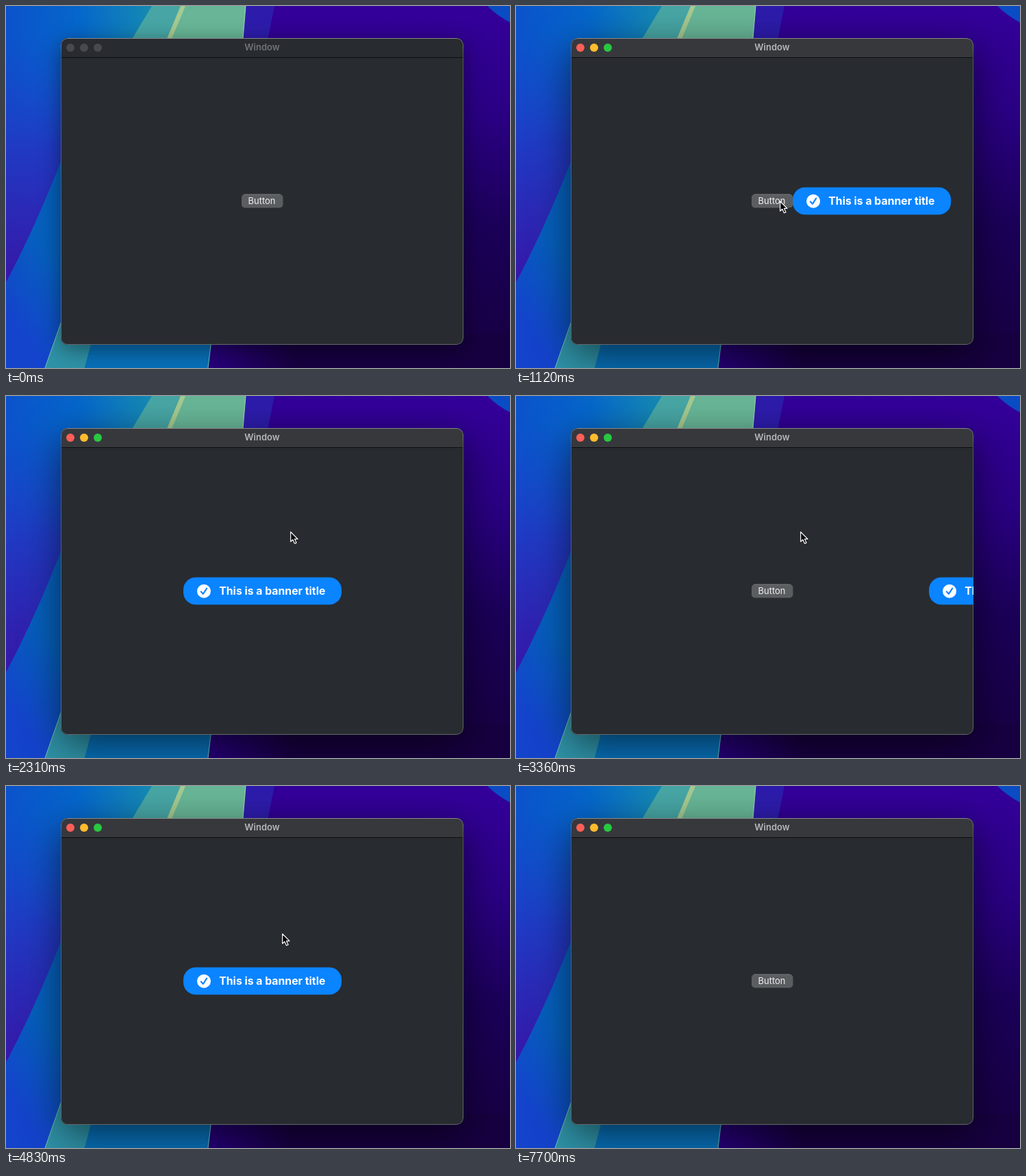
An HTML page that plays this animation: 736x530 px, repeating every 7.91 s.

```html
<!DOCTYPE html>
<html lang="en">
<head>
<meta charset="utf-8">
<title>Banner</title>
<style>
  html, body { margin: 0; width: 100%; height: 100%; overflow: hidden; background: #180040; }
  svg { display: block; width: 736px; height: 530px; }
  text { font-family: Inter, sans-serif; text-anchor: middle; }
  #shadow { fill: #282b2f; filter: drop-shadow(0 7px 16px rgba(0, 0, 0, .45)); }
  #bar { fill: #282b2f; }
  #title { font-size: 13px; font-weight: 600; fill: #717376; }
  #lights circle { fill: #48494d; }
  .active #shadow { filter: drop-shadow(0 15px 28px rgba(0, 0, 0, .55)); }
  .active #bar { fill: #37383c; }
  .active #title { fill: #b6b7b9; }
  .active #lights :nth-child(1) { fill: #ff5f57; }
  .active #lights :nth-child(2) { fill: #febc2e; }
  .active #lights :nth-child(3) { fill: #28c840; }
</style>
</head>
<body>
<svg id="stage" viewBox="0 0 736 530">
  <defs>
    <linearGradient id="sky" x1="0" y1="0" x2="215" y2="0" gradientUnits="userSpaceOnUse">
      <stop stop-color="#0b52cb"/><stop offset=".5" stop-color="#0567cb"/><stop offset="1" stop-color="#168bb2"/>
    </linearGradient>
    <linearGradient id="violet" x1="30" y1="0" x2="0" y2="400" gradientUnits="userSpaceOnUse">
      <stop offset=".1" stop-color="#1748cc" stop-opacity="0"/><stop offset=".5" stop-color="#1f3bc4"/>
      <stop offset="1" stop-color="#3617a8"/>
    </linearGradient>
    <linearGradient id="lower" x1="0" y1="450" x2="85" y2="390" gradientUnits="userSpaceOnUse">
      <stop stop-color="#1443cc"/><stop offset="1" stop-color="#0560bd"/>
    </linearGradient>
    <linearGradient id="night" x1="0" y1="0" x2="0" y2="530" gradientUnits="userSpaceOnUse">
      <stop stop-color="#34009b"/><stop offset=".3" stop-color="#2a0083"/>
      <stop offset=".6" stop-color="#1b0058"/><stop offset="1" stop-color="#170040"/>
    </linearGradient>
    <linearGradient id="dusk" x1="296" y1="0" x2="420" y2="0" gradientUnits="userSpaceOnUse">
      <stop stop-color="#27007d"/><stop offset="1" stop-color="#170040"/>
    </linearGradient>
    <linearGradient id="rim" x1="0" y1="0" x2="0" y2="1">
      <stop stop-color="#85888b"/><stop offset=".05" stop-color="#56595c"/><stop offset="1" stop-color="#64676a"/>
    </linearGradient>
    <clipPath id="frame"><rect x="80" y="47" width="588" height="449" rx="10"/></clipPath>
  </defs>

  <!-- Wallpaper -->
  <rect width="736" height="530" fill="url(#night)"/>
  <path d="M296 480H736V530H294Z" fill="url(#dusk)"/>
  <path d="M0 0H350L294 530H0Z" fill="url(#sky)"/>
  <path d="M0 0H100L80 228Q42 326 0 405Z" fill="url(#violet)"/>
  <path d="M82 224Q42 326 0 405V530H57L90 440Z" fill="url(#lower)"/>
  <path d="M213 0H350L345 60H177Z" fill="#47a6a5"/>
  <path d="M255 0H350L345 60H230Z" fill="#64b497"/>
  <path d="M255 0H275L240 60H230Z" fill="#a6ca91"/>
  <path d="M262 0H350L345 60H237Z" fill="#68b697"/>
  <path d="M350 0H392L380 60H345Z" fill="#2d1cac"/>
  <path d="M350 0L345 60" stroke="#a3dcae"/>
  <path d="M703 0Q717 14 736 24V0Z" fill="#0a4cc4"/>
  <path d="M85 450L57 530H115L128 480Z" fill="#2f93a8"/>
  <path d="M128 480L115 530H295L302 480Z" fill="#0870b8"/>
  <path d="M85 450L57 530M301 480L295 530" stroke="#74c5b4" fill="none"/>

  <!-- Window -->
  <rect id="shadow" x="80" y="47" width="588" height="449" rx="10"/>
  <g clip-path="url(#frame)">
    <rect id="bar" x="80" y="47" width="588" height="28"/>
    <rect x="80" y="75" width="588" height="1" fill="#0c0d0f"/>
    <g id="lights">
      <circle cx="94" cy="61" r="6"/><circle cx="114" cy="61" r="6"/><circle cx="134" cy="61" r="6"/>
    </g>
    <text id="title" x="374" y="65.3">Window</text>
    <rect x="344" y="275.5" width="60.5" height="20" rx="5" fill="#5b5e61"/>
    <path d="M348 276H400" stroke="#727578"/>
    <text x="373.5" y="289.8" font-size="13" fill="#f0f0f1">Button</text>
    <rect x="80.5" y="47.5" width="587" height="448" rx="9.5" fill="none" stroke="url(#rim)"/>
    <g id="banner">
      <rect y="265.5" width="231" height="40" rx="18" fill="#0a84ff"/>
      <circle cx="30" cy="285.7" r="10" fill="#fff"/>
      <path d="M25.8 286.4L28.8 289.8L34.2 281.6" fill="none" stroke="#0a84ff" stroke-width="2.1" stroke-linecap="round" stroke-linejoin="round"/>
      <text x="129.8" y="291.3" font-size="15.8" font-weight="700" fill="#fff">This is a banner title</text>
    </g>
  </g>
  <path id="cursor" d="M.7 1V15.2L3.9 12.3L6.5 18L9.1 16.9L6.6 11.4H11Z" fill="#000" stroke="#fff" stroke-width="1.2" stroke-linejoin="round"/>
</svg>
<script>
  const LOOP = 7910, STEP = 70, ACTIVATE = 1050;
  const SHOWN_X = 259, HIDDEN_X = 668, STIFFNESS = 2 * Math.PI / 200;

  // Banner toggles: [time, 1 = slide in, 0 = slide out]
  const toggles = [[1050, 1], [3255, 0], [4253, 1], [6474, 0]];

  // Pointer positions: [time, x, y]
  const path = [
    [0, 373, 535], [560, 386, 281], [630, 385, 285],
    [2170, 385, 285], [2310, 415, 198],
    [3640, 415, 198], [3920, 374.5, 282],
    [4620, 374.5, 282], [4830, 403, 215.5],
    [7210, 403, 215.5], [7700, 364, 540], [LOOP, 364, 540]
  ];

  const $ = id => document.getElementById(id);
  const place = (id, x, y) => $(id).setAttribute('transform', `translate(${x} ${y})`);

  // Critically damped spring from 0 to 1
  const spring = t => 1 - (1 + STIFFNESS * t) * Math.exp(-STIFFNESS * t);

  function bannerX(t) {
    const last = toggles.filter(([start]) => start <= t).pop();
    if (!last) return HIDDEN_X;
    const p = spring(t - last[0]);
    return HIDDEN_X + (SHOWN_X - HIDDEN_X) * (last[1] ? p : 1 - p);
  }

  function pointer(t) {
    const i = path.findIndex(([time]) => time > t);
    const [t0, x0, y0] = path[i - 1], [t1, x1, y1] = path[i];
    const u = (t - t0) / (t1 - t0), p = u * u * (3 - 2 * u);
    return [x0 + (x1 - x0) * p, y0 + (y1 - y0) * p];
  }

  function draw(now) {
    const t = Math.floor(now % LOOP / STEP) * STEP;
    $('stage').classList.toggle('active', t >= ACTIVATE);
    place('banner', bannerX(t), 0);
    place('cursor', ...pointer(t));
  }

  const origin = performance.now();
  function tick() {
    draw(performance.now() - origin);
    requestAnimationFrame(tick);
  }
  tick();
</script>
</body>
</html>
```
